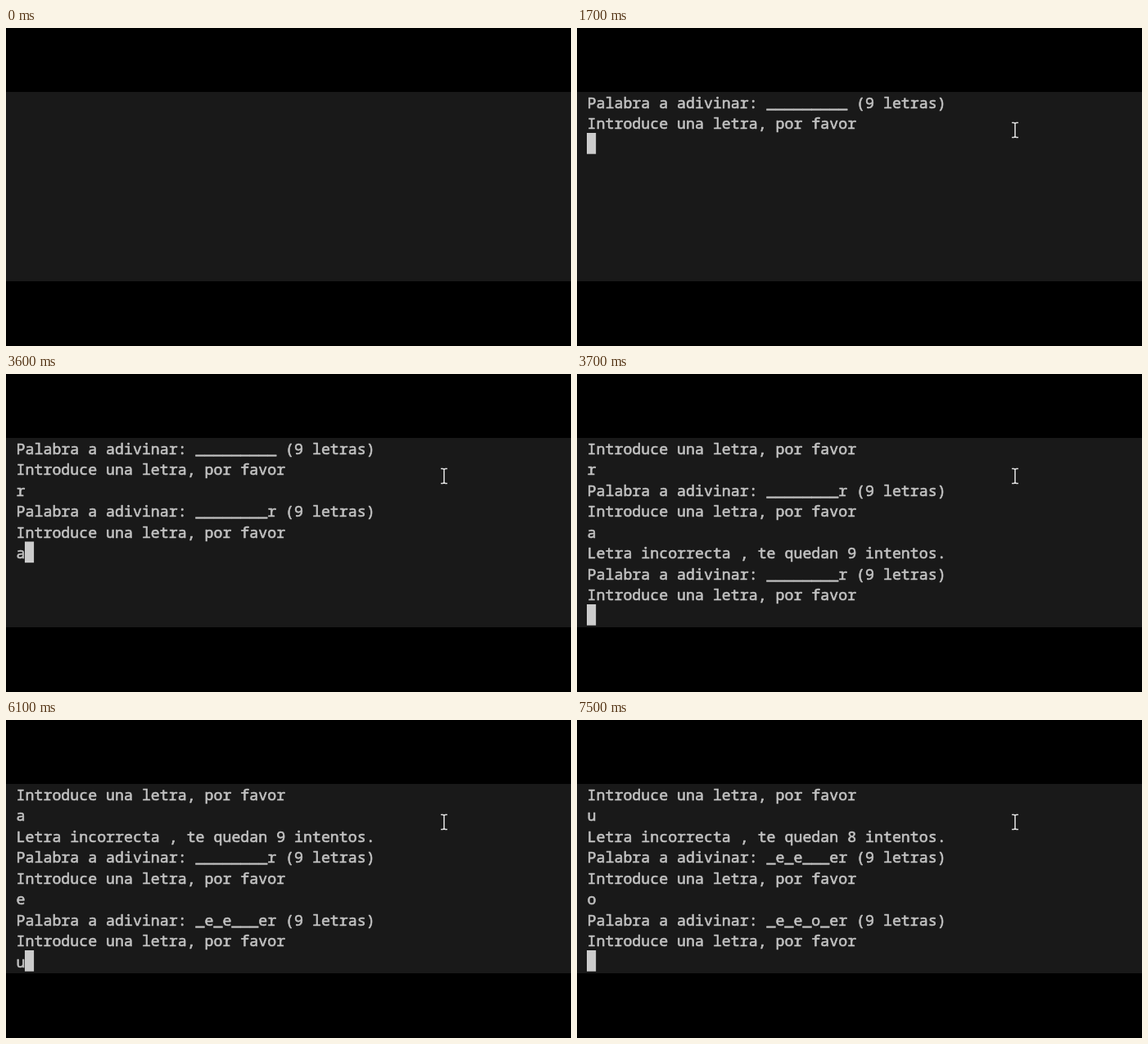
These frames come from a looping animation (690 by 388 pixels, 8 s). An HTML page with a canvas:

```html
<!DOCTYPE html>
<html lang="es">
<head>
<meta charset="utf-8">
<title>Ahorcado</title>
<style>
html, body { margin: 0; width: 100%; height: 100%; overflow: hidden; background: #000; }
canvas { display: block; }
</style>
</head>
<body>
<canvas id="stage" width="690" height="388"></canvas>
<script>
const LOOP = 8000;
const ROWS = 9, LEFT = 12, TOP = 77, PITCH = 25.5, CELL = 10.95;
const INDENT = 0.6, ASCENT = 20.6;
const READY = 300, FOCUS = 1700;
const FONT = '18.25px "Noto Sans Mono", "DejaVu Sans Mono", monospace';

const ctx = document.getElementById('stage').getContext('2d');

const prompt = word => [`Palabra a adivinar: ${word} (9 letras)`, 'Introduce una letra, por favor'];
const miss = left => `Letra incorrecta , te quedan ${left} intentos.`;

const turns = [
  { typed: 2700, enter: 2800, key: 'r', out: prompt('________r') },
  { typed: 3600, enter: 3700, key: 'a', out: [miss(9), ...prompt('________r')] },
  { typed: 4600, enter: 4700, key: 'e', out: prompt('_e_e___er') },
  { typed: 6100, enter: 6300, key: 'u', out: [miss(8), ...prompt('_e_e___er')] },
  { typed: 6900, enter: 7200, key: 'o', out: prompt('_e_e_o_er') }
];

// Terminal contents at time t; the last line is the one being edited.
function transcript(t) {
  if (t < READY) return [];
  const lines = [...prompt('_________'), ''];
  for (const { typed, enter, key, out } of turns) {
    if (t >= typed) lines[lines.length - 1] = key;
    if (t >= enter) lines.push(...out, '');
  }
  return lines.slice(-ROWS);
}

// A thin outline gives the glyphs a slightly heavier weight.
function drawLine(line, row) {
  const x = LEFT + INDENT, y = TOP + row * PITCH + ASCENT;
  ctx.fillText(line, x, y);
  ctx.strokeText(line, x, y);
}

function drawPointer(x, y) {
  const beam = () => {
    ctx.beginPath();
    for (const side of [-1, 1]) {
      const end = y + side * 9;
      ctx.moveTo(x - 4, end);
      ctx.lineTo(x - 1.5, end);
      ctx.lineTo(x, end - side);
      ctx.lineTo(x + 1.5, end);
      ctx.lineTo(x + 4, end);
    }
    ctx.moveTo(x, y - 8);
    ctx.lineTo(x, y + 8);
    ctx.stroke();
  };
  ctx.strokeStyle = '#101010';
  ctx.lineWidth = 3.2;
  beam();
  ctx.strokeStyle = '#dcdcdc';
  ctx.lineWidth = 1.6;
  beam();
}

function draw(t) {
  ctx.fillStyle = '#000';
  ctx.fillRect(0, 0, 690, 388);
  ctx.fillStyle = '#191919';
  ctx.fillRect(0, 78, 690, 231);

  const lines = transcript(t);
  ctx.font = FONT;
  ctx.fillStyle = ctx.strokeStyle = '#c2c2c2';
  ctx.lineWidth = 0.6;
  ctx.lineJoin = 'round';
  lines.forEach(drawLine);

  if (t >= FOCUS) {
    const row = lines.length - 1;
    ctx.fillStyle = '#cccccc';
    ctx.fillRect(LEFT + lines[row].length * CELL, TOP + row * PITCH, CELL + 0.2, PITCH + 0.2);
    drawPointer(535, 124.5);
  }
}

function tick() {
  draw(performance.now() % LOOP);
  requestAnimationFrame(tick);
}
tick();
</script>
</body>
</html>
```
